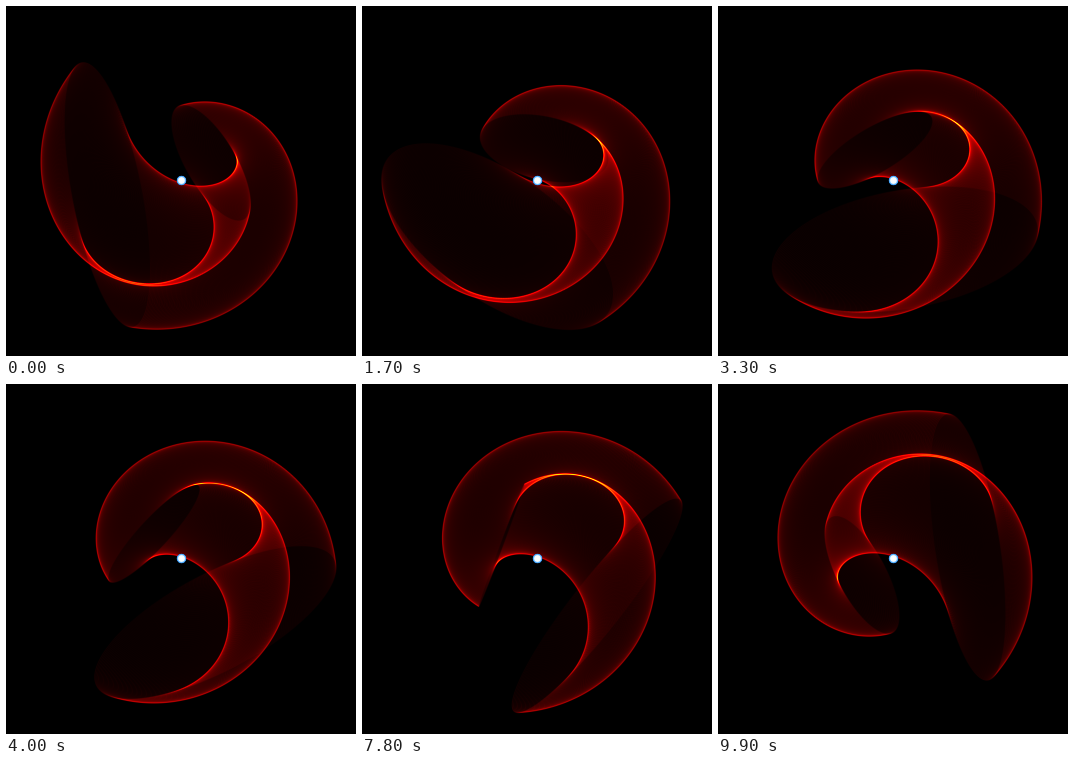
These frames come from a looping animation (350x350 px, 10 s). An HTML page with a canvas:

```html
<!DOCTYPE html>
<html lang="en">
<head>
<meta charset="utf-8">
<title>Rotating spiral plume</title>
<style>
  html, body { margin: 0; width: 100%; height: 100%; overflow: hidden; background: #000; }
  canvas { display: block; width: 100vw; height: 100vh; }
</style>
</head>
<body>
<canvas id="stage" width="350" height="350"></canvas>
<script>
const SIZE = 350;
const CENTER = { x: 175, y: 174.5 };
const RAD = Math.PI / 180;

// Conical plume: each ring is a circle on a cone whose axis turns in the orbital plane.
const OUTER_RADIUS = 155.5;
const SHRINK_PER_DEG = 0.4;
const SWEEP_DEG = 200;
const CONE = 60 * RAD;
const TILT = 29 * RAD;
const NODE = 18 * RAD;
const RINGS = 400;
const POINTS = 900;

const DENSITY_SCALE = 5000 / (RINGS * POINTS);
const BRIGHTNESS = 0.57;
const GAMMA = 0.9;

const LOOP_MS = 10000;
const STEP_MS = 100;
const HOLD_STEP = 40;
const HOLD_END_MS = 6900;
const DEG_PER_STEP = 2.5;
const NODE_STEP = 59.1;

const ctx = document.getElementById('stage').getContext('2d');
const image = ctx.createImageData(SIZE, SIZE);
const density = new Float32Array(SIZE * SIZE);

function splat(x, y, weight) {
  const px = x - 0.5, py = y - 0.5;
  const ix = Math.floor(px), iy = Math.floor(py);
  if (ix < 0 || iy < 0 || ix >= SIZE - 1 || iy >= SIZE - 1) return;
  const fx = px - ix, fy = py - iy, i = iy * SIZE + ix;
  density[i] += weight * (1 - fx) * (1 - fy);
  density[i + 1] += weight * fx * (1 - fy);
  density[i + SIZE] += weight * (1 - fx) * fy;
  density[i + SIZE + 1] += weight * fx * fy;
}

function addRing(psi, radius) {
  const along = radius * Math.cos(CONE), across = radius * Math.sin(CONE);
  const c = Math.cos(psi), s = Math.sin(psi);
  const cosTilt = Math.cos(TILT), sinTilt = Math.sin(TILT);
  const cosNode = Math.cos(NODE), sinNode = Math.sin(NODE);
  const weight = radius / OUTER_RADIUS;
  for (let j = 0; j < POINTS; j++) {
    const beta = j / POINTS * 2 * Math.PI;
    const side = across * Math.cos(beta), z = across * Math.sin(beta);
    const n = along * c - side * s;
    const m = (along * s + side * c) * cosTilt + z * sinTilt;
    splat(CENTER.x + n * cosNode + m * sinNode, CENTER.y + n * sinNode - m * cosNode, weight);
  }
}

// Black to red to yellow to white.
function paintHeat() {
  const px = image.data;
  for (let i = 0; i < density.length; i++) {
    const heat = BRIGHTNESS * Math.pow(density[i] * DENSITY_SCALE, GAMMA);
    px[4 * i] = 255 * heat / 0.365;
    px[4 * i + 1] = 255 * (heat - 0.365) / 0.381;
    px[4 * i + 2] = 255 * (heat - 0.746) / 0.254;
    px[4 * i + 3] = 255;
  }
  ctx.putImageData(image, 0, 0);
}

function paintStar() {
  const x = 175.5, y = 174.5, r = 5.2;
  const glow = ctx.createRadialGradient(x, y, 0, x, y, r);
  glow.addColorStop(0, '#fff');
  glow.addColorStop(0.55, '#f4fbff');
  glow.addColorStop(0.75, '#6cbcff');
  glow.addColorStop(0.9, '#1e86e6');
  glow.addColorStop(1, 'rgba(20, 90, 170, 0)');
  ctx.fillStyle = glow;
  ctx.beginPath();
  ctx.arc(x, y, r, 0, 2 * Math.PI);
  ctx.fill();
}

function draw(step) {
  density.fill(0);
  const start = (step - NODE_STEP) * DEG_PER_STEP;
  for (let k = 0; k < RINGS; k++) {
    const lag = (k + 0.5) / RINGS * SWEEP_DEG;
    addRing((start + lag) * RAD, OUTER_RADIUS - SHRINK_PER_DEG * lag);
  }
  paintHeat();
  paintStar();
}

function stepAt(ms) {
  return ms < HOLD_END_MS
    ? Math.min(HOLD_STEP, Math.floor(ms / STEP_MS))
    : HOLD_STEP + 1 + Math.floor((ms - HOLD_END_MS) / STEP_MS);
}

let shown = -1;
const begin = performance.now();
function tick() {
  const step = stepAt((performance.now() - begin) % LOOP_MS);
  if (step !== shown) draw(shown = step);
  requestAnimationFrame(tick);
}
tick();
</script>
</body>
</html>
```
